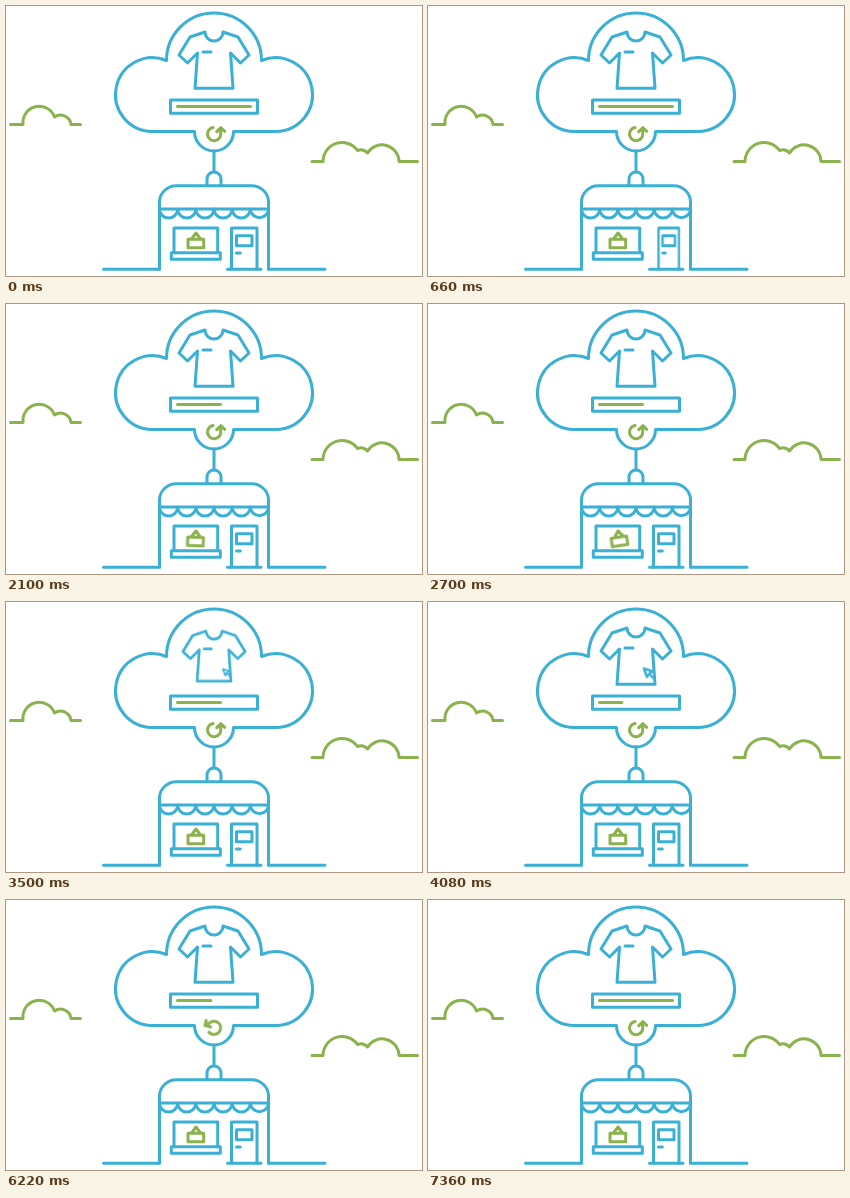
An HTML page for the animation above (7400 ms loop, 416 px wide and 270 px high).

```html
<!DOCTYPE html>
<html lang="en">
<head>
<meta charset="utf-8">
<title>Shop and cloud in sync</title>
<style>
html, body { margin: 0; width: 100%; height: 100%; overflow: hidden; background: #fff; }
svg { display: block; width: 416px; height: 270px; }
.line { fill: none; stroke: #3bb0d5; stroke-width: 3; stroke-linecap: round; stroke-linejoin: round; }
.green { stroke: #8bb24c; }

.door, .sign, .spark, .bar, .sync, .shirt, .move, .cursor {
  animation: 7400ms ease-in-out infinite;
}
.door { animation-name: door; transform-origin: 251px 263px; }
.sign { animation-name: sign; transform-origin: 190px 227px; }
.spark { animation-name: spark; stroke-dasharray: 1 3; stroke-dashoffset: 1.3; }
.bar { animation-name: bar; stroke-dasharray: 73 200; }
.sync { animation-name: sync; transform-origin: 208px 128px; }
.shirt { animation-name: shirt; transform-origin: 208px 54px; }
.move { animation-name: move; }
.cursor { animation-name: cursor; transform-origin: 0 0; stroke-width: 2.4; fill: #fff; }

@keyframes door {
  0%, 1.89% { transform: none; }
  9.46%, 13.24% { transform: scaleX(.8); animation-timing-function: ease-in; }
  17.3%, 100% { transform: none; }
}
@keyframes sign {
  0%, 17.3% { transform: rotate(0deg); animation-timing-function: ease-out; }
  19.6% { transform: rotate(72deg); }
  25.14% { transform: rotate(-45deg); }
  30.54% { transform: rotate(25deg); }
  35.95% { transform: rotate(-9deg); }
  41.9%, 100% { transform: rotate(0deg); }
}
@keyframes spark {
  0%, 17.3% { stroke-dashoffset: 1.3; }
  18.9%, 20% { stroke-dashoffset: 0; }
  21.6%, 100% { stroke-dashoffset: -1.3; }
}
@keyframes bar {
  0%, 17.3% { stroke-dashoffset: 0; }
  27.03%, 49.19% { stroke-dashoffset: 30; }
  58.92%, 73.8% { stroke-dashoffset: 60; }
  99.2%, 100% { stroke-dashoffset: 0; }
}
@keyframes sync {
  0%, 73.8% { transform: rotate(0deg); }
  99.2%, 100% { transform: rotate(-360deg); }
}
@keyframes shirt {
  0%, 44.6% { transform: none; }
  47.3%, 49.19% { transform: scale(.89); }
  52.7%, 100% { transform: none; }
}
@keyframes move {
  0%, 52.7% { transform: translate(217px, 67px); }
  67.6%, 100% { transform: translate(196px, 57.5px); }
}
@keyframes cursor {
  0%, 42.4% { transform: scale(0); visibility: hidden; }
  42.5% { transform: scale(0); visibility: visible; }
  44.6% { transform: scale(1); }
  47.3%, 49.19% { transform: scale(.75); }
  52.7%, 67.6% { transform: scale(1); visibility: visible; }
  70.4% { transform: scale(0); visibility: visible; }
  70.5%, 100% { transform: scale(0); visibility: hidden; }
}
</style>
</head>
<body>
<svg viewBox="0 0 416 270" class="line">
  <!-- sky -->
  <g class="green">
    <path d="M4.5 118.5H17A16.3 16.3 0 0 1 48.5 111A10.5 10.5 0 0 1 65 118.5H74.5"/>
    <path d="M306 155.5H317A19 19 0 0 1 351.5 144.5A9 9 0 0 1 361.5 147A17 17 0 0 1 393 155.5H411.5"/>
  </g>

  <!-- cloud -->
  <path d="M160.5 54.5A47.5 47.5 0 0 1 255.5 54.5A36.9 36.9 0 1 1 270 125.5H227.5A19.5 19.5 0 0 1 188.5 125.5H146A36.9 36.9 0 1 1 160.5 54.5Z"/>
  <g class="shirt">
    <path d="M199 26L184 31L173 49L181.5 57L191.5 47L189 82.3H227L224.500 47L234.500 57L243 49L232 31L217 26A9 9 0 0 1 199 26Z"/>
    <path d="M197 46H205"/>
  </g>
  <rect x="164.500" y="94" width="87" height="13.300"/>
  <path class="green bar" d="M171.500 100.400H244.500"/>
  <path class="green sync" d="M207 121.600A6.600 6.600 0 1 0 214.700 127.500V122M210.800 125.600L214.800 121.700L218.700 125.300"/>

  <!-- shop -->
  <path d="M208 145V165"/>
  <path d="M201 179.500V173A7 7 0 0 1 215 173V179.500"/>
  <path d="M153.500 203V196A17 16.300 0 0 1 170.500 179.700H245.500A17 16.300 0 0 1 262.500 196V203ZM153.500 203V263M262.500 203V263"/>
  <path d="M153.500 203a9.080 9 0 0 0 18.170 0a9.080 9 0 0 0 18.170 0a9.080 9 0 0 0 18.170 0a9.080 9 0 0 0 18.170 0a9.080 9 0 0 0 18.170 0a9.080 9 0 0 0 18.150 0"/>
  <path d="M97.500 263.300H153.500M221.500 263.300H255M262.500 263.300H319"/>
  <path d="M168 246.500V222H211.700V246.500M165.300 246.700H214.300V253.200H165.300Z"/>
  <g class="door">
    <path d="M225.500 263V222H251V263M230.500 229.700H246V239.800H230.500ZM230.500 247H234.300"/>
  </g>
  <g class="green">
    <path class="sign" d="M182 233.300H197.700V241.700H182ZM185.500 233L190 227L194.500 233"/>
    <path class="spark" pathLength="1" d="M220.500 229L214.500 224.300"/>
    <path class="spark" pathLength="1" d="M220.500 236.300H208.500"/>
  </g>

  <!-- pointer -->
  <g class="move">
    <path class="cursor" d="M0 0L9 3L5.500 5L3 8.500ZM5.500 5.500L8.800 9.300"/>
  </g>
</svg>
</body>
</html>
```
